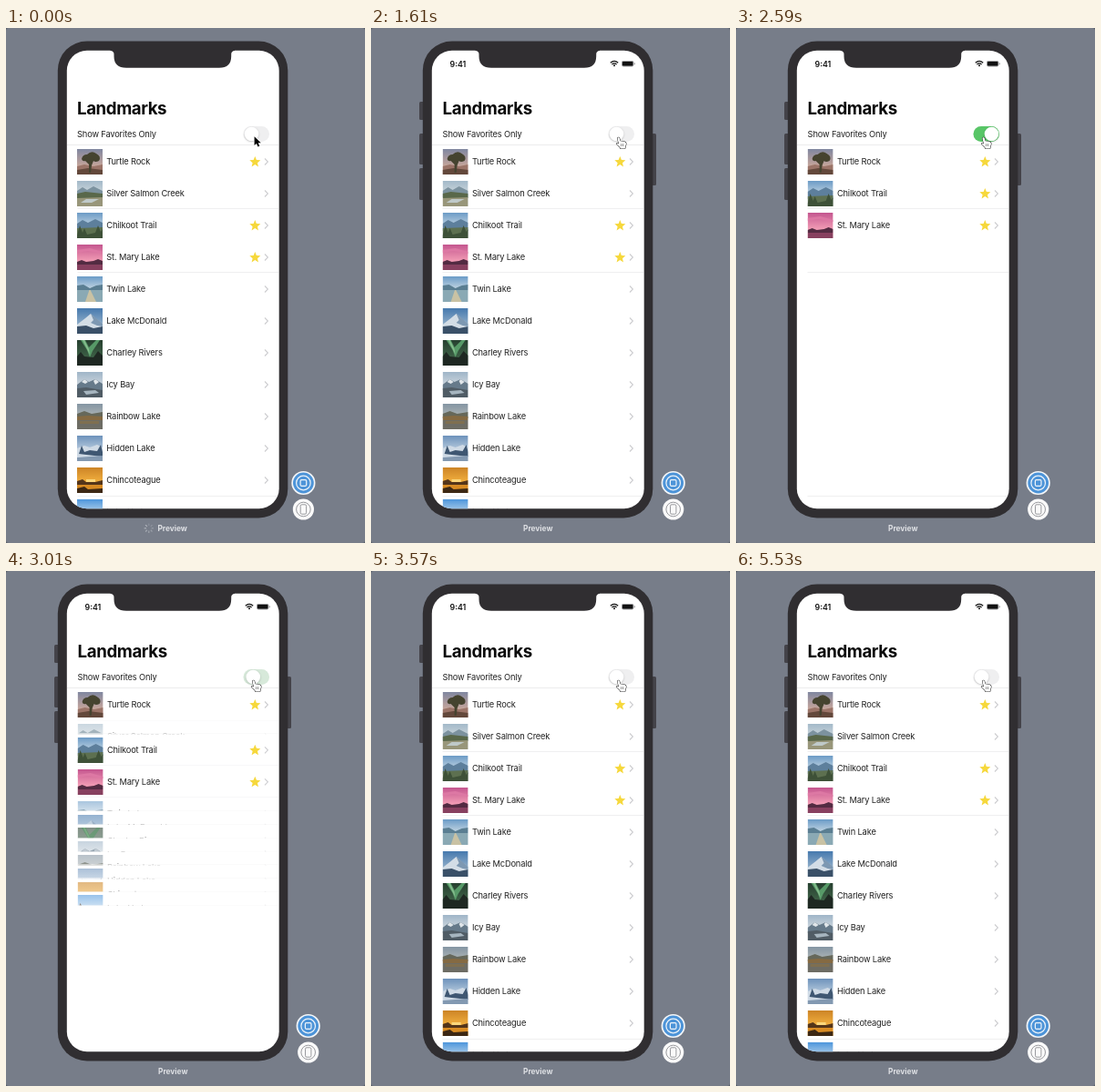
An HTML page with a canvas that plays this animation: 394x566 px, repeating every 5600 ms.

```html
<!DOCTYPE html>
<html lang="en">
<head>
<meta charset="utf-8">
<title>Landmarks preview</title>
<style>
html, body { margin: 0; width: 100%; height: 100%; overflow: hidden; background: #777d89; }
canvas { display: block; }
</style>
</head>
<body>
<canvas id="stage" width="394" height="566"></canvas>
<script>
const ctx = document.getElementById('stage').getContext('2d');
const LOOP = 5600, STEP = 70, ROW = 35, LIST_TOP = 129.5;
const LIVE = 350, LOADED = 980, FILTER_ON = 2030, FILTER_OFF = 2853, SLIDE = 350;

// Each landmark: name, favorite, sky gradient, then [color, path] layers on a 28 x 28 tile.
const landmarks = [
  ['Turtle Rock', true, ['#8087a0', '#c3a49b'], [
    ['#9b7468', 'M0 19L8 17 18 19 28 17V28H0Z'], ['#63483b', 'M0 23L12 21 28 23V28H0Z'],
    ['#45432f', 'M5 11Q6 6 11 6 16 1 21 5 27 8 24 13 20 15 18 13L16 18 15 26H13L13 17 9 13Q6 14 5 11Z']]],
  ['Silver Salmon Creek', false, ['#a3b9c9', '#d8dfe1'], [
    ['#7c929f', 'M0 11L6 7 11 10 18 6 28 11V18H0Z'], ['#59684a', 'M0 14L9 12 28 14V19H0Z'],
    ['#98967a', 'M0 19L28 18V28H0Z'], ['#bfc9c9', 'M10 20L24 20 16 24 4 24Z']]],
  ['Chilkoot Trail', true, ['#6c9bc6', '#d2dfe7'], [
    ['#5d7f9c', 'M0 12L6 8 12 11 20 7 28 11V20H0Z'], ['#5d7050', 'M0 17L28 16V28H0Z'],
    ['#3e5138', 'M0 25L3 14 6 22 8 17 11 24 20 22 23 14 26 21 28 18V28H0Z']]],
  ['St. Mary Lake', true, ['#c4568f', '#f19bb4'], [
    ['#dd78a4', 'M0 6L14 4 28 8V10L12 7 0 9Z'], ['#532b42', 'M0 19L5 17 10 19 18 18 23 16 28 18V22H0Z'],
    ['#87405f', 'M0 22H28V28H0Z']]],
  ['Twin Lake', false, ['#6a9bc7', '#dde6ea'], [
    ['#5a7e92', 'M0 10L7 9 14 13 21 10 28 9V15H0Z'], ['#8aa9b4', 'M0 15H28V28H0Z'],
    ['#c9c2a4', 'M13.4 15H14.6L21 28H9Z']]],
  ['Lake McDonald', false, ['#4679ae', '#8fadc8'], [
    ['#d3dde6', 'M0 18L9 11 15 6 20 11 28 17V24H0Z'], ['#7d98b2', 'M15 6L18 13 15 16 22 19 28 20V17Z'],
    ['#3a5068', 'M0 20L10 19 18 22 28 20V28H0Z']]],
  ['Charley Rivers', false, ['#263f2f', '#3c5f45'], [
    ['#579a68', 'M4 0L9 0 13 8 21 0 25 0 17 12 14 19 11 11Z'], ['#86bd8d', 'M6 0L8 0 13 10 14 16Z'],
    ['#1e2822', 'M0 18L4 13 8 18 18 19 23 12 28 17V28H0Z']]],
  ['Icy Bay', false, ['#9fb5c8', '#d8dee2'], [
    ['#667a8a', 'M0 14L8 8 13 11 20 8 28 13V20H0Z'], ['#e0e6ea', 'M5 11L8 8 12 11 9 13ZM18 10L20 8 24 11 20 14Z'],
    ['#505c65', 'M0 18L10 17 28 20V28H0Z'], ['#a6b5bf', 'M7 21L20 20 24 23 10 25Z']]],
  ['Rainbow Lake', false, ['#8495a3', '#b9bdb9'], [
    ['#66685a', 'M0 11L8 8 16 11 28 9V16H0Z'], ['#856a42', 'M0 14L12 13 28 14V18H0Z'],
    ['#6d6c64', 'M0 18H28V28H0Z'], ['#7f6f50', 'M3 19H24V22H3Z']]],
  ['Hidden Lake', false, ['#6d92bb', '#c1d2e2'], [
    ['#cfdae5', 'M0 14L8 11 14 13 22 10 28 13V28H0Z'], ['#3f5772', 'M2 20L5 11 8 18 14 16 22 17 26 10 28 18V23L10 21Z'],
    ['#8399b1', 'M0 24L28 22V28H0Z']]],
  ['Chincoteague', false, ['#cc8426', '#f7b541'], [
    ['#fbd77c', 'M10 13H20V16H10Z'], ['#54351a', 'M0 15L6 13 10 16 20 16 28 14V19H0Z'],
    ['#d88b23', 'M0 19H28V28H0Z'], ['#3c2713', 'M0 23L8 21 12 24 28 23V28H0Z']]],
  ['Lake Umbagog', false, ['#4d96dc', '#cfe1ee'], [
    ['#6d5339', 'M0 16L3 9 6 15 18 16 28 14V19H0Z'], ['#5d86ae', 'M0 18H28V28H0Z'],
    ['#604630', 'M0 28L3 18 7 28 20 24 28 22V28Z']]]
];

const smooth = x => { x = Math.min(1, Math.max(0, x)); return x * x * (3 - 2 * x); };

// 0 = every landmark shown, 1 = favorites only
const filterAt = (t, length) => smooth((t - FILTER_ON) / length) - smooth((t - FILTER_OFF) / length);

function rounded(x, y, w, h, r, fill) {
  ctx.fillStyle = fill;
  ctx.beginPath();
  ctx.roundRect(x, y, w, h, r);
  ctx.fill();
}

function disc(x, y, r, fill) {
  ctx.fillStyle = fill;
  ctx.beginPath();
  ctx.arc(x, y, r, 0, 7);
  ctx.fill();
}

function outline(path, color, width) {
  ctx.strokeStyle = color;
  ctx.lineWidth = width;
  ctx.stroke(new Path2D(path));
}

function label(text, x, y, size, weight, color, spacing = 0) {
  ctx.font = `${weight} ${size}px Inter, sans-serif`;
  ctx.letterSpacing = spacing + 'px';
  ctx.fillStyle = color;
  ctx.fillText(text, x, y);
}

function at(x, y, draw) {
  ctx.save();
  ctx.translate(x, y);
  draw();
  ctx.restore();
}

function hairline(y, x = 78.5, color = '#efeff0') {
  ctx.fillStyle = color;
  ctx.fillRect(x, y, 299 - x, 1);
}

function thumbnail(x, y, sky, layers) {
  at(x, y, () => {
    ctx.beginPath();
    ctx.rect(0, 0, 28, 28);
    ctx.clip();
    const gradient = ctx.createLinearGradient(0, 0, 0, 18);
    sky.forEach((color, i) => gradient.addColorStop(i, color));
    ctx.fillStyle = gradient;
    ctx.fillRect(0, 0, 28, 28);
    for (const [color, path] of layers) {
      ctx.fillStyle = color;
      ctx.fill(new Path2D(path));
    }
  });
}

function star(x, y) {
  ctx.fillStyle = '#f6d83c';
  ctx.beginPath();
  for (let i = 0; i < 10; i++) {
    const r = i % 2 ? 2.8 : 6.3, a = (i / 5 - 0.5) * Math.PI;
    ctx.lineTo(x + r * Math.cos(a), y + r * Math.sin(a));
  }
  ctx.fill();
}

function toggle(on) {
  rounded(260.5, 108, 28.5, 17, 8.5, '#efeff0');
  ctx.globalAlpha = on;
  rounded(260.5, 108, 28.5, 17, 8.5, '#58c667');
  ctx.globalAlpha = 1;
  ctx.save();
  ctx.shadowColor = '#0003';
  ctx.shadowBlur = 2.5;
  ctx.shadowOffsetY = 0.8;
  disc(269.5 + 11 * on, 116.5, 7.8, '#fff');
  ctx.restore();
}

function list(t, x) {
  label('Landmarks', x, 95, 18.7, 700, '#0b0b0b', -0.42);
  label('Show Favorites Only', x, 120.2, 9.3, 400, '#222', -0.16);
  toggle(filterAt(t, 210));
  hairline(128, 67, '#ececed');

  const shown = 1 - filterAt(t, SLIDE);
  const moving = shown > 0 && shown < 1;
  if (!moving) [198, 268, 514].forEach(y => hairline(y));

  let top = LIST_TOP;
  for (const [name, favorite, sky, layers] of landmarks) {
    const height = favorite ? ROW : ROW * shown;
    if (height > 0) {
      ctx.save();
      ctx.beginPath();
      ctx.rect(67, top, 232, height);
      ctx.clip();
      ctx.globalAlpha = favorite ? 1 : smooth(shown * 1.3);
      thumbnail(x, Math.round(top + 3.5), sky, layers);
      label(name, x + 32.3, top + 20.8, 9.3, 400, '#222', -0.16);
      if (favorite) star(273.3, top + 17.8);
      at(284, top + 14, () => outline('M0 0L3.4 3.5 0 7', '#cdcdd0', 1.1));
      if (moving) hairline(Math.round(top + height) - 1, 78.5, '#f8f8f9');
      ctx.restore();
    }
    top += height;
  }
}

function statusBar() {
  label('9:41', 86.6, 42.5, 8.8, 600, '#111');
  ctx.lineCap = 'butt';
  outline('M262.8 38.3Q267 34.5 271.2 38.3', '#111', 1.3);
  outline('M264.4 40Q267 37.8 269.6 40', '#111', 1.2);
  disc(267, 41.3, 1, '#111');
  rounded(275, 36, 13.4, 6.4, 1.8, '#9a9a9c');
  rounded(276, 36.9, 11.4, 4.6, 0.9, '#111');
  rounded(288.8, 38.2, 1, 2, 0.5, '#9a9a9c');
}

function phone(t, live) {
  if (live) {
    for (const [x, y, h] of [[53, 81, 20], [53, 116, 34], [53, 154, 35], [307, 116, 57]])
      rounded(x, y, 6, h, 1.5, '#444349');
  }
  rounded(56.8, 14.5, 252.5, 524, 32, '#302e31');
  ctx.save();
  rounded(66.8, 24.8, 232.9, 503.4, 22, '#fff');
  ctx.clip();
  if (t < LIVE || t >= LOADED) list(t, live ? 78.6 : 78);
  if (live) statusBar();
  ctx.restore();
  ctx.fillStyle = '#302e31';
  ctx.fill(new Path2D('M114.5 24V25Q118.5 25.3 118.5 29V31Q118.5 43.7 132 43.7H234Q247.2 43.7 247.2 31V29Q247.2 25.3 251 25V24Z'));
}

function controls(t, live) {
  const x = live ? 331.7 : 326.4;
  disc(x, 500, 13.1, '#f4f6f8');
  disc(x, 500, 11.4, '#4d94d8');
  ctx.strokeStyle = '#eef4fa';
  ctx.lineWidth = 1.2;
  ctx.beginPath();
  ctx.arc(x, 500, 7.8, 0, 7);
  ctx.stroke();
  ctx.beginPath();
  ctx.roundRect(x - 3.3, 496.7, 6.6, 6.6, 1.2);
  ctx.stroke();

  disc(x, 529, 11.6, '#fafafa');
  ctx.strokeStyle = '#8e8f93';
  ctx.lineWidth = 0.9;
  ctx.beginPath();
  ctx.arc(x, 529, 7.8, 0, 7);
  ctx.stroke();
  ctx.beginPath();
  ctx.roundRect(x - 3.2, 523.8, 6.4, 10.4, 1.5);
  ctx.stroke();

  label('Preview', live ? 167 : 166.4, 552.6, 8.3, 700, '#dfe1e5');
  if (!live) spinner(t);
}

function spinner(t) {
  const head = Math.floor(t / STEP);
  for (let i = 0; i < 8; i++) {
    at(156.8, 549.8, () => {
      ctx.rotate(i * Math.PI / 4);
      ctx.globalAlpha = 0.2 + 0.4 * ((i - head + 80) % 8) / 7;
      outline('M0 -2.8V-5.2', '#d8dbe0', 1.2);
    });
  }
}

function cursor(live) {
  const path = live
    ? 'M1.6 2.2Q1.4 .8 2.6 .9 3.5 1 3.8 2.2L4.6 5 8.6 5.4Q11 5.9 11 8L10.2 11 9.8 13.2H4.8L4.4 12 1 8.6Q.2 7.4 1.3 7.2L3 8.2Z'
    : 'M0 0V9.8L2.3 7.7 3.9 11.3 5.7 10.5 4.1 7H7.2Z';
  at(live ? 269 : 272.6, 119.3, () => {
    ctx.lineJoin = 'round';
    outline(path, live ? '#333' : '#fff', live ? 1.1 : 1.6);
    ctx.fillStyle = live ? '#fff' : '#000';
    ctx.fill(new Path2D(path));
    if (live) outline('M5.6 8V10.6M7.5 8V10.6', '#555', 0.7);
  });
}

function render(now) {
  const t = Math.floor(now % LOOP / STEP) * STEP;
  const live = t >= LIVE;
  ctx.fillStyle = '#555a64';
  ctx.fillRect(0, 0, 394, 566);
  rounded(0, 0, 394, 566, 3, '#777d89');
  phone(t, live);
  controls(t, live);
  cursor(live);
  requestAnimationFrame(render);
}
requestAnimationFrame(render);
</script>
</body>
</html>
```
